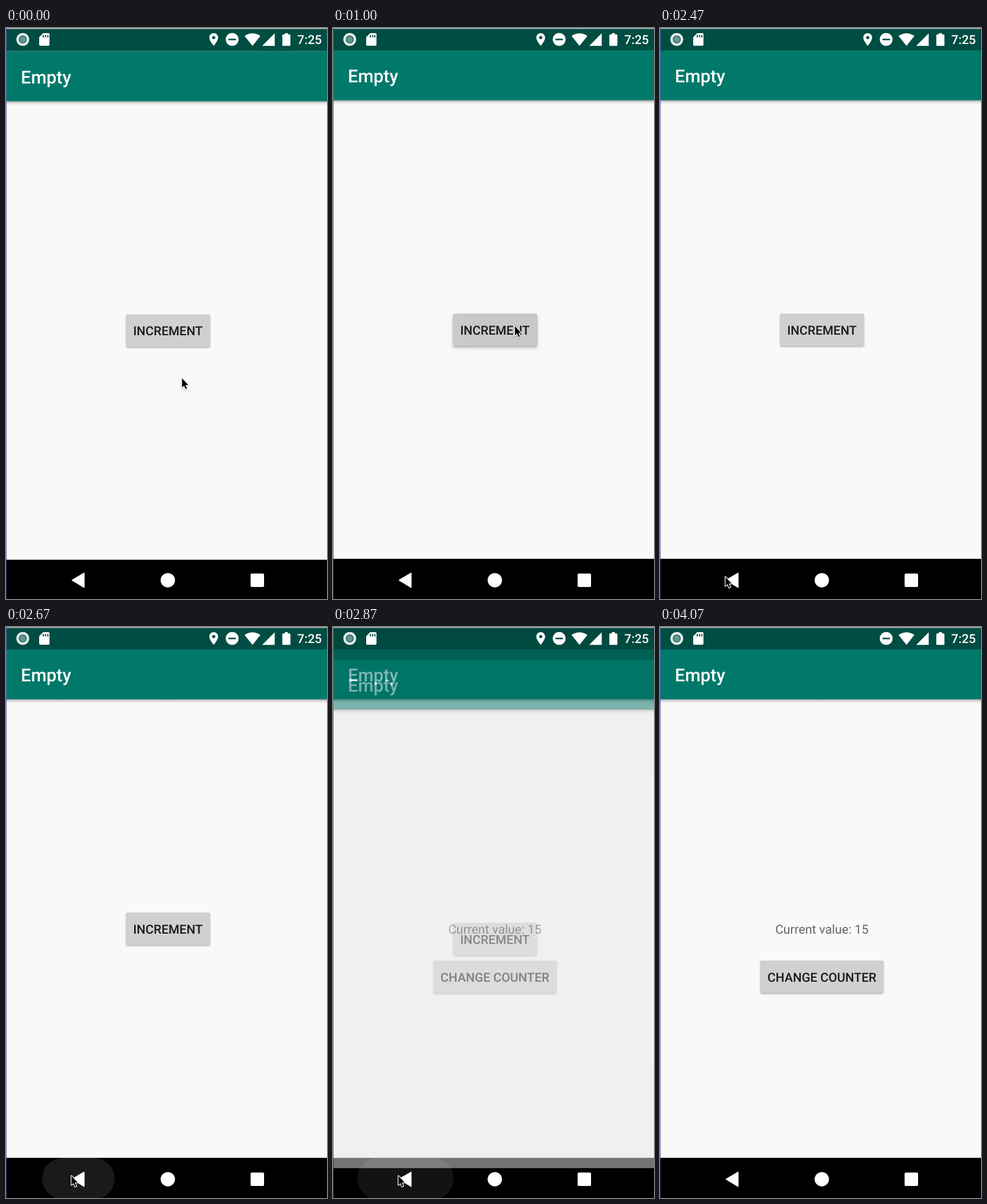
Recreate the animation shown at these times as an HTML page. Size 561 by 998 pixels, loop 4.19 s.

```html
<!DOCTYPE html>
<html lang="en">
<head>
<meta charset="utf-8">
<title>Counter app</title>
<style>
  html, body { margin: 0; width: 100%; height: 100%; overflow: hidden; background: #000; }
  svg { display: block; width: 561px; height: 998px; }
  text {
    font-family: Roboto, "Noto Sans", sans-serif;
    font-size: 21.8px;
    text-rendering: geometricPrecision;
  }
  .title { font-size: 31.2px; font-weight: 500; fill: #fff; }
  .label { font-weight: 500; fill: #1a1a1a; text-anchor: middle; }
  .value { fill: #666; text-anchor: middle; }
  .clock { font-weight: 500; fill: #fff; }
  .rest { filter: blur(1.5px); opacity: .28; }
  .lift { filter: blur(3.2px); opacity: 0; }
</style>
</head>
<body>
<svg viewBox="0 0 561 998">
  <defs>
    <linearGradient id="shade" x2="0" y2="1">
      <stop offset="0" stop-opacity=".36"/>
      <stop offset=".4" stop-opacity=".13"/>
      <stop offset="1" stop-opacity="0"/>
    </linearGradient>
    <clipPath id="face"><rect x="209.5" y="499" width="147.5" height="56.5" rx="3"/></clipPath>
    <g id="frame">
      <rect width="561" height="998" fill="#f9f9f9"/>
      <rect width="561" height="39" fill="#004d43"/>
      <rect y="39" width="561" height="87.3" fill="#00796b"/>
      <rect y="126.3" width="561" height="7" fill="url(#shade)"/>
      <rect y="927.8" width="561" height="72" fill="#000"/>
      <text class="title" x="26" y="95">Empty</text>
    </g>
  </defs>

  <g id="home">
    <use href="#frame"/>
    <text class="value" x="283" y="536.2">Current value: 15</text>
    <rect class="rest" x="175.5" y="585" width="215" height="56.5" rx="3"/>
    <rect x="175" y="583" width="216" height="56.5" rx="3" fill="#cfd1d0"/>
    <text class="label" x="283" y="619.8">CHANGE COUNTER</text>
  </g>

  <g id="editor">
    <use href="#frame"/>
    <rect class="rest" id="rest" x="210" y="501" width="146.5" height="56.5" rx="3"/>
    <rect class="lift" id="lift" x="209.5" y="503" width="147.5" height="56.5" rx="3"/>
    <rect x="209.5" y="499" width="147.5" height="56.5" rx="3" fill="#cfd1d0"/>
    <g id="press" clip-path="url(#face)">
      <rect x="209" y="499" width="149" height="58" opacity=".045"/>
      <circle id="ripple" cx="301" cy="517" opacity=".027"/>
    </g>
    <text class="label" x="283" y="535.9">INCREMENT</text>
  </g>

  <rect id="navRipple" y="928" height="72" rx="36" fill="#fff"/>

  <g fill="#fff">
    <circle cx="29.3" cy="20" r="11.2" fill="#e3eceb"/>
    <circle cx="29.3" cy="20" r="7" fill="#2f6d64"/>
    <circle cx="29.3" cy="20" r="5.2" fill="#639890"/>
    <path d="M65 9h9a2 2 0 0 1 2 2v18a2 2 0 0 1-2 2H60a2 2 0 0 1-2-2V16z"/>
    <path d="M64.2 12.2h2v4.4h-2zM68.2 12.2h2v4.4h-2zM72.2 12.2h2v4.4h-2z" fill="#004d43"/>
    <path id="pin" transform="translate(349.8 6.8) scale(1.1)"
      d="M12 2C8.13 2 5 5.13 5 9c0 5.25 7 13 7 13s7-7.75 7-13c0-3.87-3.13-7-7-7zm0 9.5a2.5 2.5 0 1 1 0-5 2.5 2.5 0 0 1 0 5z"/>
    <circle cx="395.3" cy="20" r="11.2"/>
    <rect x="388.8" y="18.7" width="13" height="2.7" fill="#004d43"/>
    <path d="M430.8 31.2L417 14C417.6 13.6 422.9 9.3 430.8 9.3S444 13.6 444.5 14z"/>
    <path d="M447.8 31.2h21.8V9.2z"/>
    <path d="M487.3 9h5.4v2.2h2.9a1.5 1.5 0 0 1 1.5 1.5v17a1.5 1.5 0 0 1-1.5 1.5h-11.2a1.5 1.5 0 0 1-1.5-1.5v-17a1.5 1.5 0 0 1 1.5-1.5h2.9z"/>
    <text class="clock" x="509" y="28.3">7:25</text>
    <path d="M116 965.2L136.3 953V977.4z" stroke="#fff" stroke-width="2" stroke-linejoin="round"/>
    <circle cx="282.8" cy="965.2" r="12.5"/>
    <rect x="427.5" y="953.5" width="23.5" height="23.5" rx="2"/>
  </g>

  <rect width="561" height="1.6" fill="#b9bfbe"/>
  <rect width="1" height="928" fill="#5063b0"/>
  <rect y="928" width="1" height="70" fill="#2c3a66"/>

  <g id="cursor">
    <path transform="scale(1.05)" d="M1.3 2.2V17.4L4.7 14.2 7.2 20.1 9.5 19.1 7 13.3H11.7z"
      stroke="#fff" stroke-width="2.4" paint-order="stroke" stroke-linejoin="round"
      style="filter: drop-shadow(0 1px 1px rgba(0,0,0,.3))"/>
  </g>
</svg>

<script>
  const LOOP = 4190;
  const el = id => document.getElementById(id);
  const set = (id, attrs) => {
    for (const name in attrs) el(id).setAttribute(name, attrs[name]);
  };
  const ramp = (n, from, to) => Math.min(1, Math.max(0, (n - from) / (to - from)));
  const easeOut = (k, power) => 1 - (1 - k) ** power;
  const smooth = k => k * k * (3 - 2 * k);
  const mix = (a, b, k) => a + (b - a) * k;

  function draw(ms) {
    // The screen refreshes 15 times a second
    const n = Math.floor(ms * .015 + .06);

    // Pointer: up to the button, then down to the back key
    const reach = ramp(n, 6, 10), leave = smooth(ramp(n, 29, 37));
    const x = mix(mix(306.3, 316.6, easeOut(reach, 3.6)), 113, leave);
    const y = mix(mix(610, 519, easeOut(reach, 1.55)), 957, leave);
    set('cursor', { transform: `translate(${x} ${y})`, visibility: n < 52 ? 'visible' : 'hidden' });
    set('pin', { visibility: n < 50 ? 'visible' : 'hidden' });

    // Two taps on the button
    const down = ramp(n, 10, 12) - ramp(n, 14, 16) + ramp(n, 22, 26) - ramp(n, 29, 32);
    const spread = n < 20 ? ramp(n, 10, 14) : ramp(n, 22, 26);
    el('lift').style.opacity = .32 * down;
    el('rest').style.opacity = .28 * (1 - .7 * down);
    set('press', { opacity: down });
    set('ripple', { r: 12 + 64 * spread });

    // The editor settles on entry; on back it drops and fades
    const drop = 1.6 * (1 - ramp(n, 0, 2)) ** 2 + 18 * ramp(n, 40, 43) ** 3.4;
    set('editor', {
      transform: `translate(0 ${drop})`,
      opacity: 1 - ramp(n, 41, 44) ** 1.55
    });
    set('home', { opacity: mix(.75, 1, ramp(n, 40, 44)) });

    // Back key ripple
    const half = 84.5 * easeOut(ramp(n, 38, 42), 2);
    set('navRipple', {
      x: 126.5 - half,
      width: 2 * half,
      opacity: .1 * ramp(n, 38, 40) * (1 - ramp(n, 42, 46))
    });
  }

  const start = performance.now();
  function loop() {
    draw((performance.now() - start) % LOOP);
    requestAnimationFrame(loop);
  }
  loop();
</script>
</body>
</html>
```
